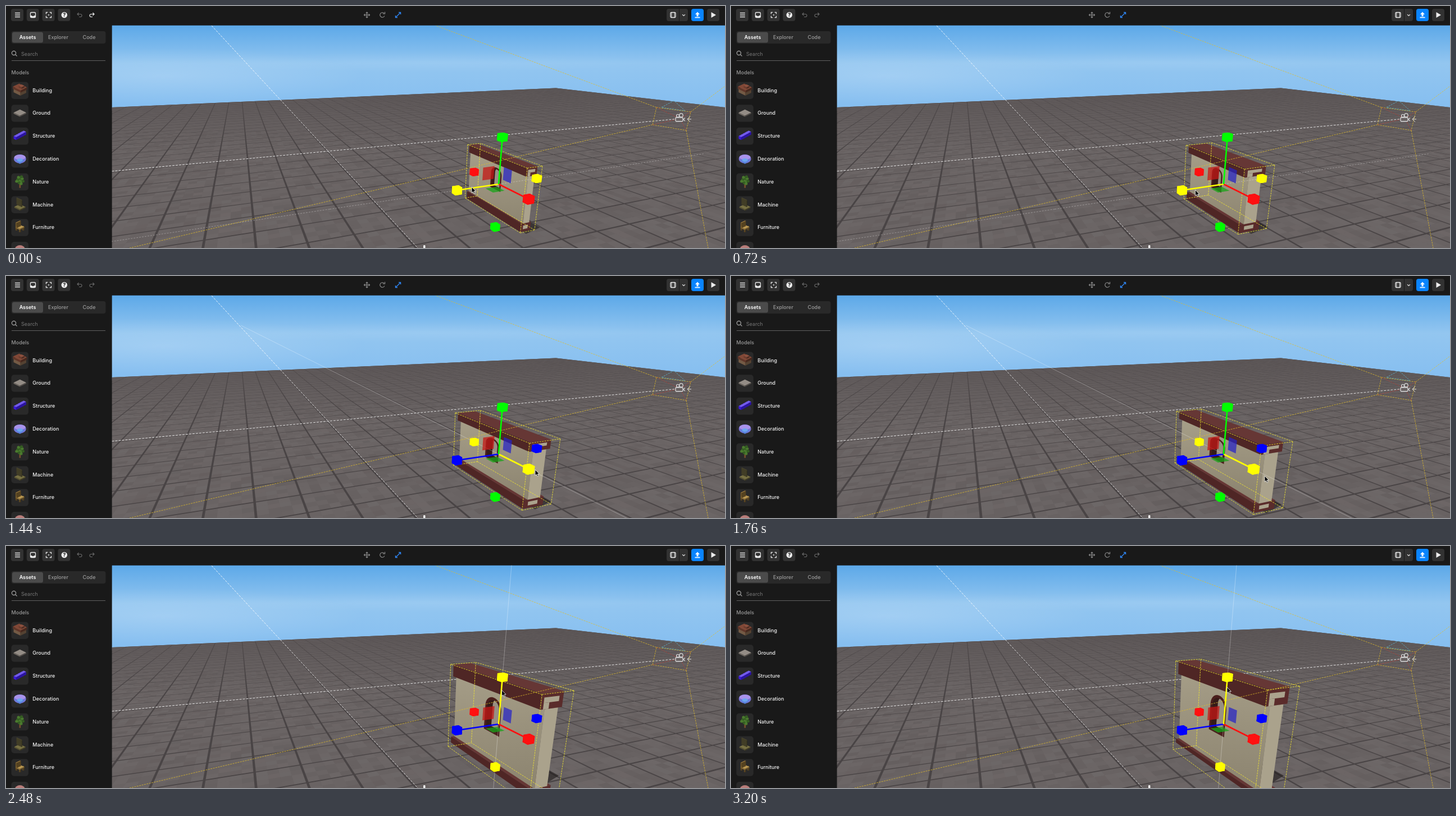
An HTML page with a canvas for the animation above (3.28 s loop, 1280x432 px).

```html
<!DOCTYPE html>
<html lang="en">
<head>
<meta charset="utf-8">
<title>Scene editor</title>
<style>
html, body { margin: 0; width: 100%; height: 100%; overflow: hidden; background: #191919; }
canvas { position: absolute; left: 0; top: 0; width: 1280px; height: 432px; }
span { position: absolute; font: 500 9px/12px Inter, "Open Sans", sans-serif; white-space: nowrap; transform: translateY(-50%); }
span.mid { transform: translate(-50%, -50%); }
</style>
</head>
<body>
<canvas id="view" width="1280" height="432"></canvas>
<script>
const W = 1280, H = 432, LEFT = 188.5, TOP = 34.5, LOOP = 3280, STEP = 80;
const view = document.getElementById('view').getContext('2d');
const back = document.createElement('canvas');
back.width = W; back.height = H;
let g = back.getContext('2d');

// Camera: axes run along the wall's length, its thickness, and down; EYE is the gizmo seen from the camera.
const AXES = [[-.395, -.341, .853], [.919, -.149, .366], [0, .927, .375]];
const EYE = [143, -45, 695], CX = 734, CY = 363, F = 695, FLOOR = 60;
const dot = (p, q) => p[0] * q[0] + p[1] * q[1] + p[2] * q[2];
const toCam = (...v) => EYE.map((e, k) => e + v[0] * AXES[0][k] + v[1] * AXES[1][k] + v[2] * AXES[2][k]);
const proj = (...v) => {
  const [x, y, z] = toCam(...v);
  return [CX + F * x / z, CY + F * y / z];
};
const floorAt = (x, y) => {
  const ray = [x - CX, y - CY, F];
  const s = (dot(EYE, AXES[2]) + FLOOR) / dot(ray, AXES[2]);
  return [0, 1].map(k => s * dot(ray, AXES[k]) - dot(EYE, AXES[k]));
};

function trace(pts, close) {
  g.beginPath();
  pts.forEach(p => g.lineTo(...p));
  if (close) g.closePath();
}
function fill(pts, color) { trace(pts, true); g.fillStyle = color; g.fill(); }
function stroke(pts, color, width = 1, dash = [], close = false) {
  trace(pts, close);
  g.strokeStyle = color; g.lineWidth = width;
  g.setLineDash(dash); g.stroke(); g.setLineDash([]);
}
function round(x, y, w, h, r, color) {
  g.beginPath(); g.roundRect(x, y, w, h, r); g.fillStyle = color; g.fill();
}
function frame(x, y, w, h, color) {
  g.beginPath(); g.roundRect(x, y, w, h, 1.5);
  g.strokeStyle = color; g.lineWidth = 1.3; g.stroke();
}
function ring(x, y, r, color, from = 0, to = 7) {
  g.beginPath(); g.arc(x, y, r, from, to);
  g.strokeStyle = color; g.lineWidth = 1.2; g.stroke();
}
function oval(x, y, rx, ry, color) {
  g.beginPath(); g.ellipse(x, y, rx, ry, 0, 0, 7); g.fillStyle = color; g.fill();
}
// Open arrowhead with its tip at (x, y), pointing along angle a in quarter turns.
function tip(x, y, size, a, color, width = 1.2) {
  const arm = s => [x - size * Math.cos((a + s) * Math.PI / 2), y - size * Math.sin((a + s) * Math.PI / 2)];
  stroke([arm(.5), [x, y], arm(-.5)], color, width);
}
function label(text, x, y, color, mid, weight = 500) {
  const s = document.createElement('span');
  s.textContent = text;
  s.style.cssText = `left:${x}px;top:${y}px;color:${color};font-weight:${weight}`;
  if (mid) s.className = 'mid';
  document.body.append(s);
}

let seed = 7;
const rnd = () => (seed = seed * 16807 % 2147483647) / 2147483647;

function glow(x, y, rx, ry, alpha) {
  g.save();
  g.translate(x, y); g.scale(rx, ry);
  const light = g.createRadialGradient(0, 0, 0, 0, 0, 1);
  light.addColorStop(0, `rgba(235,245,255,${alpha})`);
  light.addColorStop(1, 'rgba(235,245,255,0)');
  g.fillStyle = light; g.fillRect(-1, -1, 2, 2);
  g.restore();
}

function drawSky() {
  const sky = g.createLinearGradient(0, TOP, 0, 185);
  sky.addColorStop(0, '#5ca8e8');
  sky.addColorStop(.45, '#93c6f0');
  sky.addColorStop(1, '#85bef0');
  g.fillStyle = sky;
  g.fillRect(LEFT, TOP, W, 152);
  glow(280, 125, 360, 50, .2);
  glow(750, 100, 420, 18, .08);
}

function drawFloor() {
  const tile = 75, gap = 1.9, parts = 4, inner = tile - 2 * gap, cell = inner / parts;
  const [a0, b0] = floorAt(573, 259);
  const square = (a, b, s) => [[a, b], [a + s, b], [a + s, b + s], [a, b + s]].map(p => proj(...p, FLOOR));
  g.save();
  trace([[LEFT, 181], [979, 146.5], [W, 181], [W, H], [LEFT, H]], true);
  g.clip();
  g.fillStyle = '#494445'; g.fillRect(0, 140, W, H);
  for (let i = 28; i >= -17; i--) for (let j = -22; j < 46; j++) {
    const a = a0 + i * tile + gap, b = b0 + j * tile + gap, z = toCam(a, b, FLOOR)[2];
    if (z < 220) continue;
    fill(square(a, b, inner), '#6a6464');
    if (z > 1500) continue;
    for (let k = 0; k < parts * parts; k++) {
      const v = rnd() - .5, c = v < 0 ? 35 : 150;
      fill(square(a + k % parts * cell, b + (k / parts | 0) * cell, cell), `rgba(${c},${c - 5},${c - 5},${Math.abs(v) * .13})`);
    }
  }
  const haze = g.createLinearGradient(0, 146, 0, 260);
  haze.addColorStop(0, 'rgba(84,78,79,.6)');
  haze.addColorStop(1, 'rgba(84,78,79,0)');
  g.fillStyle = haze; g.fillRect(0, 140, W, 120);
  g.restore();
}

const GOLD = 'rgba(226,190,40,.75)', DASH = [3, 1.5];

function drawGuides() {
  const white = 'rgba(255,255,255,.82)', pale = '#ddd';
  stroke([[366, 35], [733, H]], white, 1, [4, 2]);
  stroke([[LEFT, 295], [1190, 202]], white, 1, [4, 2]);
  const near = [[1158, 181], [1219, 189], [1211, 222]], last = [1151, 212];
  [[765, 35], [W, 143], [1250, H]].forEach((p, i) => stroke([near[i], p], GOLD, 1, DASH));
  stroke([...near, last], GOLD, 1, DASH, true);
  [...near, last].forEach(p => stroke([p, [1200, 201]], 'rgba(205,55,45,.6)', 1, DASH));
  stroke([[1167, 181], [1189, 169], [1209, 187]], 'rgba(90,190,215,.75)', 1, DASH, true);
  ring(1196, 196, 2.5, pale);
  ring(1202, 195, 3.2, pale);
  round(1192, 199, 13, 7, 2, '#686262');
  frame(1192, 199, 13, 7, pale);
  tip(1206, 202.5, 4, 2, pale);
  tip(1213, 202, 7, 2, pale, 1);
  stroke([[1213, 202], [1220, 202]], pale);
  round(743, 427, 3.5, 8, 1, '#f4f4f4');
}

function drawTopBar() {
  const ink = '#ededed', grey = '#8b8b8b', blue = '#2f86f5', face = '#323232';
  g.fillStyle = '#191919';
  g.fillRect(0, 0, W, TOP); g.fillRect(0, 0, LEFT, H);
  for (let i = 0; i < 4; i++) round(9 + i * 27.8, 5, 22, 22, 4, face);
  round(1248, 5, 22, 22, 4, face);
  round(1176, 5, 38, 22, 4, face);
  round(1198, 5, 1, 22, 0, '#191919');
  round(1220, 5, 22, 22, 4, '#0a84ff');

  for (let y = 12.5; y < 20; y += 3.5) stroke([[16, y], [25, y]], ink, 1.4);
  frame(43.5, 11.5, 9, 9, ink);
  round(43.5, 17, 9, 3.5, 1, ink);
  oval(48, 17, 1.8, 1.3, face);
  for (let q = .5; q < 4; q++) {
    const r = 6.4, a = q * Math.PI / 2;
    tip(76 + r * Math.cos(a), 16 + r * Math.sin(a), 2.8, q, ink, 1.3);
  }
  oval(76, 16, 1.1, 1.1, ink);
  oval(103.8, 16, 5.3, 5.3, ink);

  for (let q = 0; q < 4; q++) {
    const x = 642.5 + 5 * Math.cos(q * Math.PI / 2), y = 16 + 5 * Math.sin(q * Math.PI / 2);
    stroke([[642.5, 16], [x, y]], grey, 1.2);
    tip(x, y, 2.6, q, grey);
  }
  ring(670, 16, 4.2, grey, .4, 5.5);
  tip(674.5, 14, 3.5, .5, grey);
  stroke([[694, 20], [702, 12]], blue, 1.3);
  tip(702.5, 11.5, 3.5, -.5, blue, 1.4);
  tip(693.5, 20.5, 3.5, 1.5, blue, 1.4);

  frame(1183, 11.5, 9, 9, ink);
  for (const x of [1185, 1190]) stroke([[x, 12], [x, 20]], ink);
  tip(1206.5, 17.5, 3.5, 1, ink, 1.1);
  fill([[1231, 10.5], [1235, 15], [1227, 15]], '#fff');
  round(1229.5, 14, 3, 4.5, 0, '#fff');
  round(1226.5, 19.7, 9, 1.6, 0, '#fff');
  fill([[1255.5, 11], [1264, 16], [1255.5, 21]], ink);
}

// Small isometric block standing on (x, y).
function block(x, y, w, d, h, hue, sat, light) {
  const at = (a, b, c) => [x + (a * w - b * d) * .87, y + (a * w + b * d) * .42 - c * h];
  const tone = k => `hsl(${hue},${sat}%,${light * k}%)`;
  fill([at(-.5, -.5, 1), at(.5, -.5, 1), at(.5, .5, 1), at(-.5, .5, 1)], tone(1));
  fill([at(-.5, .5, 1), at(.5, .5, 1), at(.5, .5, 0), at(-.5, .5, 0)], tone(.75));
  fill([at(.5, -.5, 1), at(.5, .5, 1), at(.5, .5, 0), at(.5, -.5, 0)], tone(.55));
}
const thumbs = {
  Building() {
    block(0, 4, 14, 12, 7, 28, 25, 48);
    block(0, -2, 16, 13, 4, 14, 40, 36);
    block(3, -5, 6, 6, 3, 14, 38, 40);
  },
  Ground() { block(0, 1, 13, 13, 2, 30, 6, 55); },
  Structure() {
    for (let i = 0; i < 4; i++) block(6 - i * 4, -2 + i * 2.2, 5, 7, 5, 250, 78, 64);
  },
  Decoration() {
    oval(0, 0, 11, 8, '#7a74d8');
    oval(0, -3, 10, 4.5, '#a892ea');
    fill([[-9, 2], [9, 2], [0, 9]], '#5a86e0');
    oval(0, 2, 5, 3, '#6fa6ee');
  },
  Nature() {
    round(-1.2, 0, 2.6, 11, 0, '#76502f');
    for (let i = 0; i < 12; i++) {
      const a = i * 2.4, r = 2.1 * Math.sqrt(i);
      oval(r * Math.cos(a), r * Math.sin(a) - 3, 2.7, 2.5, i % 2 ? '#4a7a2e' : '#345c22');
    }
  },
  Machine() {
    block(0, 6, 12, 11, 2, 52, 28, 36);
    block(-1, 2, 11, 1, 12, 52, 26, 27);
  },
  Furniture() {
    for (let i = -1; i < 2; i++) block(i * 6, 8 - Math.abs(i) * 3, 2, 2, 7, 38, 45, 36);
    block(0, 1, 9, 9, 2, 40, 42, 52);
    block(-3, -1, 2, 9, 9, 38, 45, 42);
  },
  ''() { oval(0, -2, 9, 7, '#b77c79'); }
};

function drawSidebar() {
  round(9.5, 45, 168, 22, 4, '#292929');
  round(11, 46.5, 55, 19, 3.5, '#4b4b4b');
  ring(14, 84, 3.6, '#aaa');
  stroke([[16.7, 86.7], [19.5, 89.5]], '#aaa', 1.1);
  round(10, 97, 167, 1, 0, '#606060');
  label('Assets', 38.5, 56, '#fff', true, 600);
  label('Explorer', 93, 56, '#9b9b9b', true);
  label('Code', 148, 56, '#9b9b9b', true);
  label('Search', 27, 85.5, '#777', false, 400);
  label('Models', 9.5, 119, '#999');
  label('?', 103.8, 16, '#282828', true, 800);
  Object.keys(thumbs).forEach((name, i) => {
    const y = 150.5 + i * 40.8;
    round(9.5, y - 15, 30.5, 30.5, 5, '#292929');
    g.save(); g.translate(24.8, y); thumbs[name](); g.restore();
    label(name, 47.3, y, '#f2f2f2');
  });
}

// Two-tone slab wall between +-a, with its front, end and top in view.
function box(a, b0, b1, d0, d1, [front, end, top]) {
  fill([proj(a, b0, d0), proj(a, b1, d0), proj(-a, b1, d0), proj(-a, b0, d0)], top);
  fill([proj(a, b0, d0), proj(-a, b0, d0), proj(-a, b0, d1), proj(a, b0, d1)], front);
  fill([proj(-a, b0, d0), proj(-a, b1, d0), proj(-a, b1, d1), proj(-a, b0, d1)], end);
}

function drawWall(l, w, h) {
  const a = .97 * l, reach = .5 * w + 30, base = Math.min(h, 77), band = .73;
  fill([proj(l, 0, FLOOR), proj(l, reach, FLOOR), proj(-.85 * l, reach, FLOOR), proj(-a, 0, FLOOR)], 'rgba(30,26,26,.6)');

  const brown = ['#4f2625', '#5a2c2b', '#663735'];
  const plaster = g.createLinearGradient(0, 318 - h, 0, 340 + h);
  plaster.addColorStop(0, '#a59d87');
  plaster.addColorStop(1, '#8c8470');
  const patch = (b0, b1, d0, d1) =>
    fill([proj(-a, b0 * w, d0 * h), proj(-a, b1 * w, d0 * h), proj(-a, b1 * w, d1 * h), proj(-a, b0 * w, d1 * h)], '#aba38d');

  box(a, -.85 * w, .5 * w, band * h, base, brown);
  if (h < base + 1) patch(-.55, .1, .8, .92);
  box(a, -.6 * w, .25 * w, -band * h, band * h, [plaster, '#aaa28c', plaster]);

  const arch = (b, r, sill) => {
    const mid = -.03 * l, pts = [];
    for (let q = 0; q <= Math.PI; q += Math.PI / 14)
      pts.push(proj(mid + r * l * Math.cos(q), b * w, -h * (.38 + r * 1.15 * Math.sin(q))));
    return [...pts, proj(mid - r * l, b * w, sill * h), proj(mid + r * l, b * w, sill * h)];
  };
  fill(arch(-.6, .18, .14), '#4a1f1d');
  g.save();
  trace(arch(-.6, .135, .08), true); g.clip();
  fill(arch(-.6, .135, .08), '#351b18');
  fill(arch(-.2, .135, .08), '#988f82');
  g.restore();

  box(a, -.85 * w, .5 * w, -h, -band * h, brown);
  patch(-.7, .25, -.93, -.84);
  patch(-.7, -.35, -.84, -band);
}

const SIDES = [-1, 1];

function drawBounds(l, w, h) {
  const edge = (p, q) => stroke([proj(...p), proj(...q)], 'rgba(240,230,50,.85)', 1, DASH);
  for (const i of SIDES) for (const j of SIDES) {
    edge([-l, i * w, j * h], [l, i * w, j * h]);
    edge([i * l, -w, j * h], [i * l, w, j * h]);
    edge([i * l, j * w, -h], [i * l, j * w, h]);
  }
}

// A point given by its value on one axis and the pair on the other two.
const onAxis = (axis, v, pair = [0, 0]) => {
  const p = [...pair];
  p.splice(axis, 0, v);
  return p;
};
const REACH = 84, CUBE = 6.3;
const square = (lo, hi) => [[lo, lo], [hi, lo], [hi, hi], [lo, hi]];

function drawCube(center, color) {
  for (let axis = 0; axis < 3; axis++) for (const s of SIDES)
    fill(square(-CUBE, CUBE).map(q => proj(...onAxis(axis, s * CUBE, q).map((v, k) => v + center[k]))), color);
}

function drawGizmo(active) {
  const color = ['#ff1010', '#0000ff', '#00ff00'].map((c, k) => k === active ? '#ffff00' : c);
  ['rgba(196,24,22,.75)', 'rgba(38,34,200,.72)', 'rgba(25,165,25,.75)'].forEach((tone, k) =>
    fill(square(-34.5, -11.5).map(q => proj(...onAxis(k, 0, q))), tone));
  color.forEach((c, k) => stroke([proj(0, 0, 0), proj(...onAxis(k, -REACH))], c, 2.6));
  color.forEach((c, k) => SIDES.forEach(s => drawCube(onAxis(k, s * REACH), c)));
}

function drawAxis(axis) {
  g.save();
  g.beginPath(); g.rect(LEFT, TOP, W, H); g.clip();
  const far = axis ? 560 : 60000;
  stroke([proj(...onAxis(axis, -300)), proj(...onAxis(axis, -REACH)), proj(...onAxis(axis, REACH)), proj(...onAxis(axis, far))],
    'rgba(255,255,255,.3)', 1, axis === 1 ? [3, 2] : []);
  if (axis) stroke([proj(...onAxis(axis, -300)), proj(...onAxis(axis, -700))], 'rgba(255,255,255,.3)', 1, axis === 1 ? [3, 2] : []);
  g.restore();
}

function drawHistory(redo) {
  for (const s of SIDES) {
    const color = s < 0 && redo ? '#eee' : '#666';
    g.save();
    g.translate(142 - s * 11, 16); g.scale(s, 1);
    tip(-4, -1.5, 3.6, 2, color);
    g.beginPath(); g.moveTo(-4, -1.5);
    g.arc(1.5, 1, 2.5, -Math.PI / 2, Math.PI / 2);
    g.lineTo(-1, 3.5); g.stroke();
    g.restore();
  }
}

function drawCursor(x, y) {
  const pts = [[0, 0], [0, 10.5], [2.5, 8.4], [4.2, 12], [5.9, 11.2], [4.3, 7.7], [7.4, 7.6]].map(p => [x + p[0], y + p[1]]);
  fill(pts, '#000');
  stroke(pts, '#fff', .8, [], true);
}

const ramp = (t, from, to) => Math.min(1, Math.max(0, (t - from) / (to - from)));

function draw(t) {
  // Three drags, with the pointer travelling between the handles.
  const thicken = ramp(t, 0, 560), toLength = ramp(t, 640, 920);
  const lengthen = ramp(t, 960, 1880), toHeight = ramp(t, 1880, 2080), raise = ramp(t, 2080, 2560);
  const l = 90 + 44.8 * lengthen, w = 14.3 + 14.2 * thicken, h = 54.5 + 39.2 * raise;
  const active = toLength < .3 ? 1 : toLength < .85 ? -1 : toHeight < .2 ? 0 : toHeight < .6 ? -1 : 2;
  const x = 829 - 44 * thicken + 145 * toLength + 23 * lengthen - 72 * toHeight + 2 * raise;
  const y = 323 + 5 * thicken + toLength + 32 * lengthen - 77 * toHeight - 32 * raise;

  g.drawImage(back, 0, 0);
  drawWall(l, w, h);
  if (active >= 0) drawAxis(active);
  stroke([[1151, 212], [220, H]], GOLD, 1, DASH);
  drawBounds(l, w, h);
  drawGizmo(active);
  drawHistory(toLength === 0);
  drawCursor(x, y);
}

drawSky();
drawFloor();
drawGuides();
drawTopBar();
drawSidebar();
g = view;

const start = performance.now();
function tick() {
  const t = (performance.now() - start) % LOOP;
  draw(Math.floor(t / STEP) * STEP);
  requestAnimationFrame(tick);
}
tick();
</script>
</body>
</html>
```
